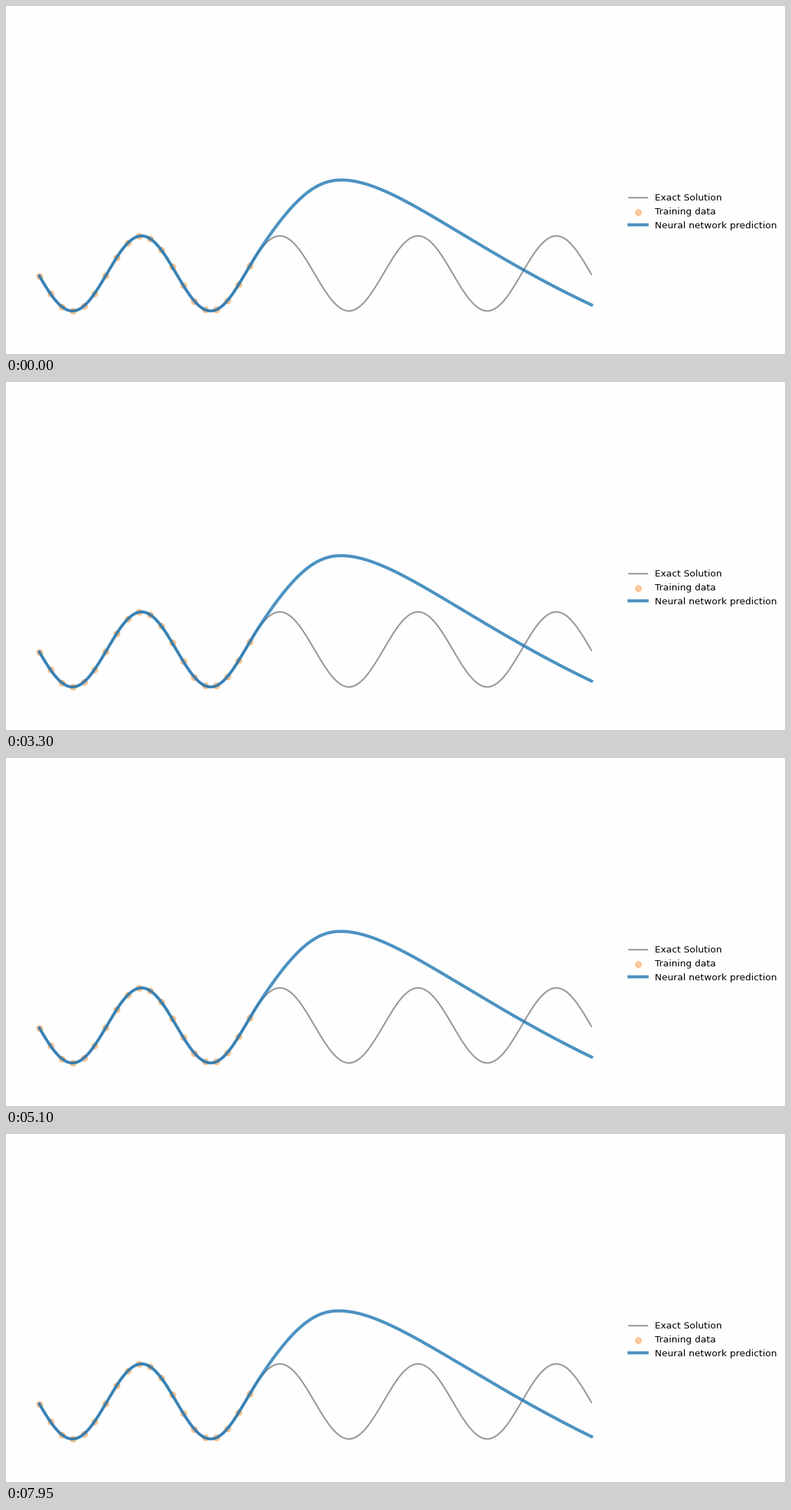
Animation, 1119 px wide and 501 px high, one loop 8000 ms. Source, as a matplotlib script:

```python
import numpy as np
import matplotlib.pyplot as plt
from matplotlib.animation import FuncAnimation

W, H, DPI = 1119, 501, 80
FRAMES, STEP = 160, 50
X0, X1 = 48, 841
MID, AMP, PERIOD, PHASE_X = 385, 54, 198.6, 45.8
K = 2 * np.pi / PERIOD
JOIN, TAU, CROSS = 350, 70, 744

# Height of the predicted crest over time: slow drift with two training spikes
CREST_T = [0, 400, 850, 1450, 2550, 3250, 3400, 3550, 3750, 4000, 4250,
           4650, 5100, 5950, 6500, 7050, 7150, 7400, 7650, 7950]
CREST_Y = [250.5, 248.6, 247, 245.6, 243, 241.8, 266.5, 263, 259.5, 256.3, 254,
           251.5, 249.6, 247.6, 246.4, 245.6, 274, 264, 258, 254.6]


def exact(x):
    return MID + AMP * np.sin(K * (x - PHASE_X))


def rise(x, px, py, curve):
    """Quintic from the end of the training data up to the crest."""
    h = px - JOIN
    v = (x - JOIN) / h
    angle = K * (JOIN - PHASE_X)
    y0 = exact(JOIN)
    v0 = AMP * K * np.cos(angle) * h
    a0 = -AMP * K * K * np.sin(angle) * h * h
    d = py - y0 - v0 - a0 / 2
    e = -v0 - a0
    f = curve * h * h - a0
    return (y0 + v0 * v + a0 / 2 * v**2 + (10 * d - 4 * e + f / 2) * v**3
            + (-15 * d + 7 * e - f) * v**4 + (6 * d - 3 * e + f / 2) * v**5)


def fall_terms(u):
    return u - TAU * (1 - np.exp(-u / TAU)), -u * u / 2


def prediction(x, ms):
    t = ms / 1000
    py = np.interp(ms, CREST_T, CREST_Y)
    px = 482 - 0.45 * (py - 250.5) - 0.25 * t
    end = 430.3 + 0.92 * (py - 250.5) + 0.2 * t
    slope, bend = np.linalg.solve(
        [fall_terms(CROSS - px), fall_terms(X1 - px)],
        [129.8, end - py])
    y = exact(x)
    left = (x > JOIN) & (x <= px)
    right = x > px
    y[left] = rise(x[left], px, py, slope / TAU - bend)
    a, b = fall_terms(x[right] - px)
    y[right] = py + slope * a + bend * b
    return y


plt.rcParams["font.family"] = "DejaVu Sans"
fig = plt.figure(figsize=(W / DPI, H / DPI), dpi=DPI, facecolor="#fefefe")
ax = fig.add_axes([0, 0, 1, 1])
ax.set_xlim(0, W)
ax.set_ylim(H, 0)
ax.axis("off")

xs = np.linspace(X0, X1, 500)
train = xs[:200:10]
ax.plot(xs, exact(xs), color="grey", lw=2, alpha=0.8, label="Exact Solution")
ax.scatter(train, exact(train), s=60, color="tab:orange", alpha=0.4,
           label="Training data")
line, = ax.plot(xs, prediction(xs, 0), color="tab:blue", lw=4, alpha=0.8,
                label="Neural network prediction")
handles, labels = ax.get_legend_handles_labels()
order = [labels.index(name) for name in
         ("Exact Solution", "Training data", "Neural network prediction")]
ax.legend([handles[i] for i in order], [labels[i] for i in order],
          loc=(889.4 / W, 172.9 / H), frameon=False, fontsize=12)


def update(i):
    line.set_ydata(prediction(xs, i * STEP))
    return line,


anim = FuncAnimation(fig, update, frames=FRAMES, interval=STEP,
                     repeat=True, repeat_delay=0)
plt.show()
```
